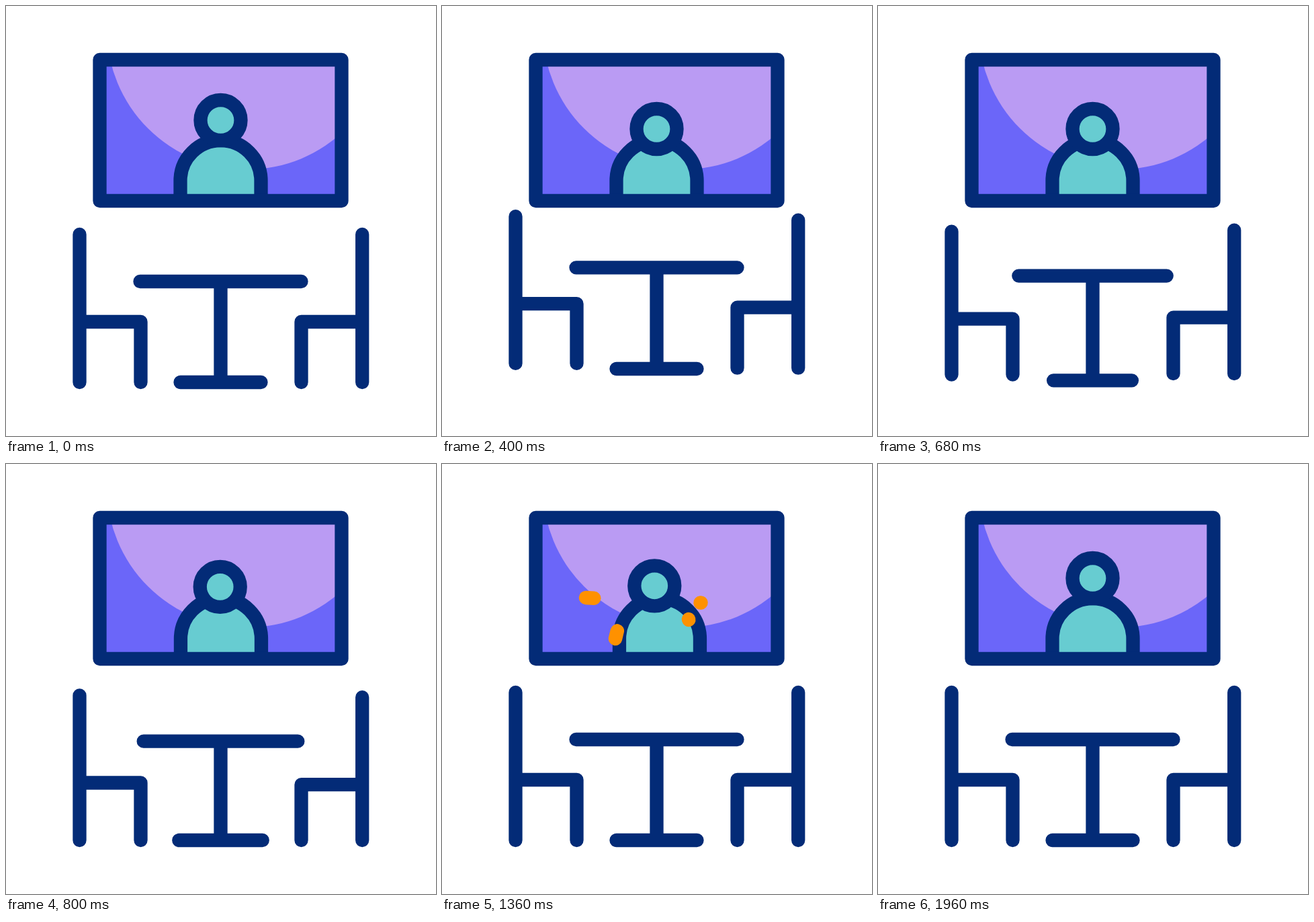
An HTML page for the animation above (2000 ms loop, 640 px wide and 640 px high).

```html
<!DOCTYPE html>
<html lang="en">
<head>
<meta charset="utf-8">
<title>Video meeting room</title>
<style>
  html, body { margin: 0; width: 100%; height: 100%; overflow: hidden; background: #fff; }
  svg { display: block; width: 100%; height: 100%; }
  .line { stroke: #032b77; stroke-width: 20.3; stroke-linecap: round; stroke-linejoin: round; fill: none; }
  .person { fill: #67ccd1; stroke-linecap: butt; }
  .dash { stroke: #ff9100; stroke-width: 20.5; stroke-linecap: round; fill: none; }
</style>
</head>
<body>
<svg viewBox="0 0 640 640">
  <clipPath id="inside"><rect x="140" y="80" width="360" height="210"/></clipPath>
  <g clip-path="url(#inside)">
    <rect x="140" y="80" width="360" height="210" fill="#6b66f9"/>
    <circle cx="359" cy="34.3" r="209" fill="#ba9bf3"/>
    <path id="body" class="line person" d="M259.5 290V260a60 60 0 0 1 120 0V290"/>
    <circle id="head" class="line person" r="30"/>
    <path id="speechLeft" class="dash"/>
    <path id="speechRight" class="dash"/>
  </g>
  <rect class="line" x="139.5" y="80" width="360" height="210"/>
  <path id="chairLeft" class="line"/>
  <path id="chairRight" class="line"/>
  <path id="table" class="line"/>
</svg>
<script>
const LOOP = 2000, TICK = 40;
const el = id => document.getElementById(id);
const mix = (a, b, p) => a + (b - a) * p;
const ease = p => p * p * (3 - 2 * p);

// Keys are [tick, value] pairs, eased between neighbours.
function track(...keys) {
  return tick => {
    if (tick <= keys[0][0]) return keys[0][1];
    for (let i = 1; i < keys.length; i++) {
      const [t0, v0] = keys[i - 1], [t1, v1] = keys[i];
      if (tick < t1) return mix(v0, v1, ease((tick - t0) / (t1 - t0)));
    }
    return keys[keys.length - 1][1];
  };
}

const head = {
  x: track([18.5, 0], [29.5, -15.5], [39, 11.2], [49, 0]),
  y: track([0, 170], [8, 183], [18.5, 183], [29.5, 180.4], [39, 182.3], [49, 170])
};
const bodyX = track([18.5, 0], [29.5, 9.2], [39, -1.1], [49, 0]);

const chairs = [
  { id: "chairLeft", back: 109.5, front: 200.5,
    upper: track([0, 0], [13, -31], [19, 5], [24, 0]),
    lower: track([0, 0], [13, -32.5], [14, -32.5], [19, 0]) },
  { id: "chairRight", back: 530.2, front: 439.5,
    upper: track([4, 0], [14, -33], [19, 8], [24, 0]),
    lower: track([5, 0], [14, -36.5], [19, 0]) }
];

const table = {
  top: track([3, 410], [14, 380.5], [19, 413], [24, 410]),
  base: track([3, 560], [13, 534.5], [18, 560]),
  topHalf: track([10, 120], [14, 108], [25, 120]),
  baseHalf: track([10, 60], [14, 51], [19, 62.4], [25, 60])
};

// Each dash is x0, y0, x1, y1 from its inner to its outer end.
const speech = [
  { id: "speechLeft", dashes: [[249, 201, 214, 199], [266, 227, 258, 260]],
    outer: track([26, 0], [31, 1]), inner: track([31, 0], [36, 1]) },
  { id: "speechRight", dashes: [[384.5, 206.5, 419.5, 204.5], [367, 231, 375, 264]],
    outer: track([33.5, 0], [38.5, 1]), inner: track([38.5, 0], [43.5, 1]) }
];

const setPath = (id, d) => el(id).setAttribute("d", d);

function drawChair({ id, back, front, upper, lower }, tick) {
  const up = upper(tick), foot = 560 + lower(tick);
  setPath(id, `M${back} ${340 + up}V${foot}M${back} ${470 + up}H${front}V${foot}`);
}

function drawTable(tick) {
  const mid = 319.5, top = table.top(tick), base = table.base(tick);
  const bar = (y, half) => `M${mid - half} ${y}H${mid + half}`;
  setPath("table", bar(top, table.topHalf(tick)) + `M${mid} ${top}V${base}` +
    bar(base, table.baseHalf(tick)));
}

function drawSpeech({ id, dashes, outer, inner }, tick) {
  const from = inner(tick), to = outer(tick);
  setPath(id, to > from ? dashes.map(([x0, y0, x1, y1]) =>
    `M${mix(x0, x1, from)} ${mix(y0, y1, from)}L${mix(x0, x1, to)} ${mix(y0, y1, to)}`
  ).join("") : "");
}

function render(time) {
  const tick = Math.floor(((time + 2) % LOOP) / TICK);
  el("head").setAttribute("transform", `translate(${319.5 + head.x(tick)} ${head.y(tick)})`);
  el("body").setAttribute("transform", `translate(${bodyX(tick)} 0)`);
  speech.forEach(s => drawSpeech(s, tick));
  chairs.forEach(c => drawChair(c, tick));
  drawTable(tick);
}

function loop(now) {
  render(now);
  requestAnimationFrame(loop);
}
render(0);
requestAnimationFrame(loop);
</script>
</body>
</html>
```
